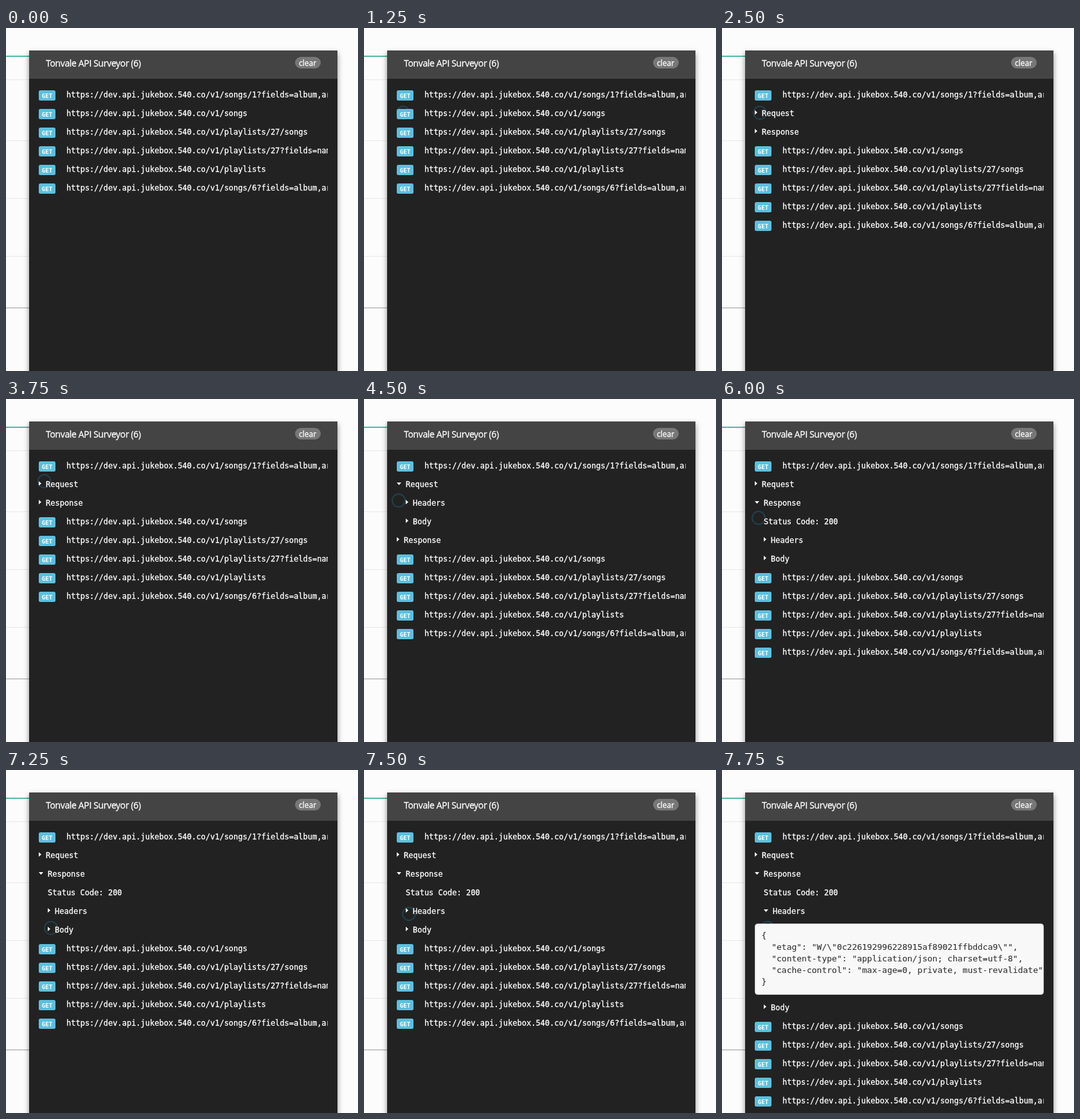
An HTML page that plays this animation: 548 by 534 pixels, repeating every 8 s.

```html
<!DOCTYPE html>
<html lang="en">
<head>
<meta charset="utf-8">
<title>API panel</title>
<style>
  html, body { margin: 0; width: 100%; height: 100%; overflow: hidden; background: #fcfcfc; }
  svg { display: block; width: 548px; height: 534px; }
  text { white-space: pre; fill: #fff; stroke: #fff; stroke-width: .3px; }
  .ui { font-family: "Open Sans", sans-serif; }
  .row { font: 12px "DejaVu Sans Mono", monospace; }
  .tag { font: bold 9px "DejaVu Sans Mono", monospace; text-anchor: middle; stroke: none; }
  .code { font: 13px "DejaVu Sans Mono", monospace; fill: #333; stroke: #333; stroke-width: .1px; }
  .panel { filter: drop-shadow(0 4px 4px rgba(0, 0, 0, .45)); }
  #ring { fill: none; stroke: #1b424d; stroke-width: 1.8px; mix-blend-mode: lighten; }
</style>
</head>
<body>
<svg viewBox="0 0 548 534">
  <clipPath id="inner"><rect x="36" y="79" width="465" height="455"/></clipPath>
  <path d="M0 80.5H40M0 175.5H40M0 265.5H40M0 355.5H40" stroke="#e9e9e9"/>
  <path d="M0 44H40" stroke="#55b9a6" stroke-width="2"/>
  <path d="M0 435.5H40" stroke="#b4b4b4"/>
  <path d="M0 436.5H40" stroke="#dedede"/>
  <rect class="panel" x="36" y="35" width="480" height="520" fill="#222"/>
  <rect x="36" y="35" width="480" height="44" fill="#444"/>
  <text class="ui" x="62" y="60" font-size="14" letter-spacing="-.35">Tonvale API Surveyor (6)</text>
  <rect x="450" y="45" width="40" height="18" rx="9" fill="#777"/>
  <text class="ui" x="456" y="58.5" font-size="12">clear</text>
  <g id="list" clip-path="url(#inner)"></g>
  <circle id="ring" r="10"/>
</svg>
<script>
const LOOP = 8000, STEP = 250, PITCH = 29;
const list = document.getElementById('list');
const ring = document.getElementById('ring');

const urls = [
  'songs/1?fields=album,artist', 'songs', 'playlists/27/songs',
  'playlists/27?fields=name', 'playlists', 'songs/6?fields=album,artist'
].map(path => 'https://dev.api.jukebox.540.co/v1/' + path);

const headers = [
  '{',
  '  "etag": "W/\\"0c226192996228915af89021ffbddca9\\"",',
  '  "content-type": "application/json; charset=utf-8",',
  '  "cache-control": "max-age=0, private, must-revalidate",',
  '}'
];

// pointer path: time, x, y
const path = [
  [500, 51, 44], [1000, 60, 115], [1250, 61, 132], [1750, 61, 115],
  [2500, 59, 132], [3250, 59, 116], [4000, 60, 134], [4250, 57, 140],
  [4500, 54, 158], [5000, 58, 139], [5250, 57, 158], [5750, 54, 166],
  [6000, 57, 185], [6500, 62, 215], [6750, 68, 222], [7250, 70, 246],
  [7500, 70, 224], [7750, 71, 246]
];

function pointer(t) {
  const i = path.findIndex(p => p[0] >= t);
  if (i < 1) return path[0];
  const a = path[i - 1], b = path[i], k = (t - a[0]) / (b[0] - a[0]);
  return a.map((v, j) => v + (b[j] - v) * k);
}

const text = (cls, x, y, s) => `<text class="${cls}" x="${x}" y="${y}">${s}</text>`;

function build(t) {
  let y = 103, out = '';
  const label = (x, s) => {
    out += text('row', x, y + 4.5, s);
    y += PITCH;
  };
  const request = url => {
    out += `<rect x="51" y="${y - 6}" width="26" height="16" rx="2.5" fill="#5bc0de"/>`
      + text('tag', 64, y + 5.5, 'GET');
    label(94, url);
  };
  const node = (x, s, open) => {
    const caret = open ? `M${x} ${y - 2}h7l-3.5 4z` : `M${x} ${y - 4}v7l4 -3.5z`;
    out += `<path d="${caret}" fill="#fff"/>`;
    label(x + (open ? 14 : 11), s);
  };

  request(urls[0]);
  if (t >= 2000) {
    const reqOpen = t >= 4250 && t < 5000, resOpen = t >= 5750, headOpen = t >= 7750;
    node(51, 'Request', reqOpen);
    if (reqOpen) {
      node(65, 'Headers');
      node(65, 'Body');
    }
    node(51, 'Response', resOpen);
    if (resOpen) {
      label(65, 'Status Code: 200');
      node(65, 'Headers', headOpen);
      if (headOpen) {
        const top = y - 9;
        out += `<rect x="51.5" y="${top + .5}" width="449" height="110" rx="4" fill="#f8f8f8" stroke="#ccc"/>`;
        headers.forEach((s, i) => out += text('code', 61.5, top + 23 + i * 18, s));
        y += 121;
      }
      node(65, 'Body');
    }
  }
  urls.slice(1).forEach(request);
  return out;
}

let last = '';
function frame() {
  const t = Math.floor(performance.now() % LOOP / STEP) * STEP;
  const html = build(t);
  if (html !== last) list.innerHTML = last = html;
  const [, x, y] = pointer(t);
  ring.setAttribute('cx', x);
  ring.setAttribute('cy', y);
  ring.setAttribute('visibility', t < 500 ? 'hidden' : 'visible');
  requestAnimationFrame(frame);
}
frame();
</script>
</body>
</html>
```
